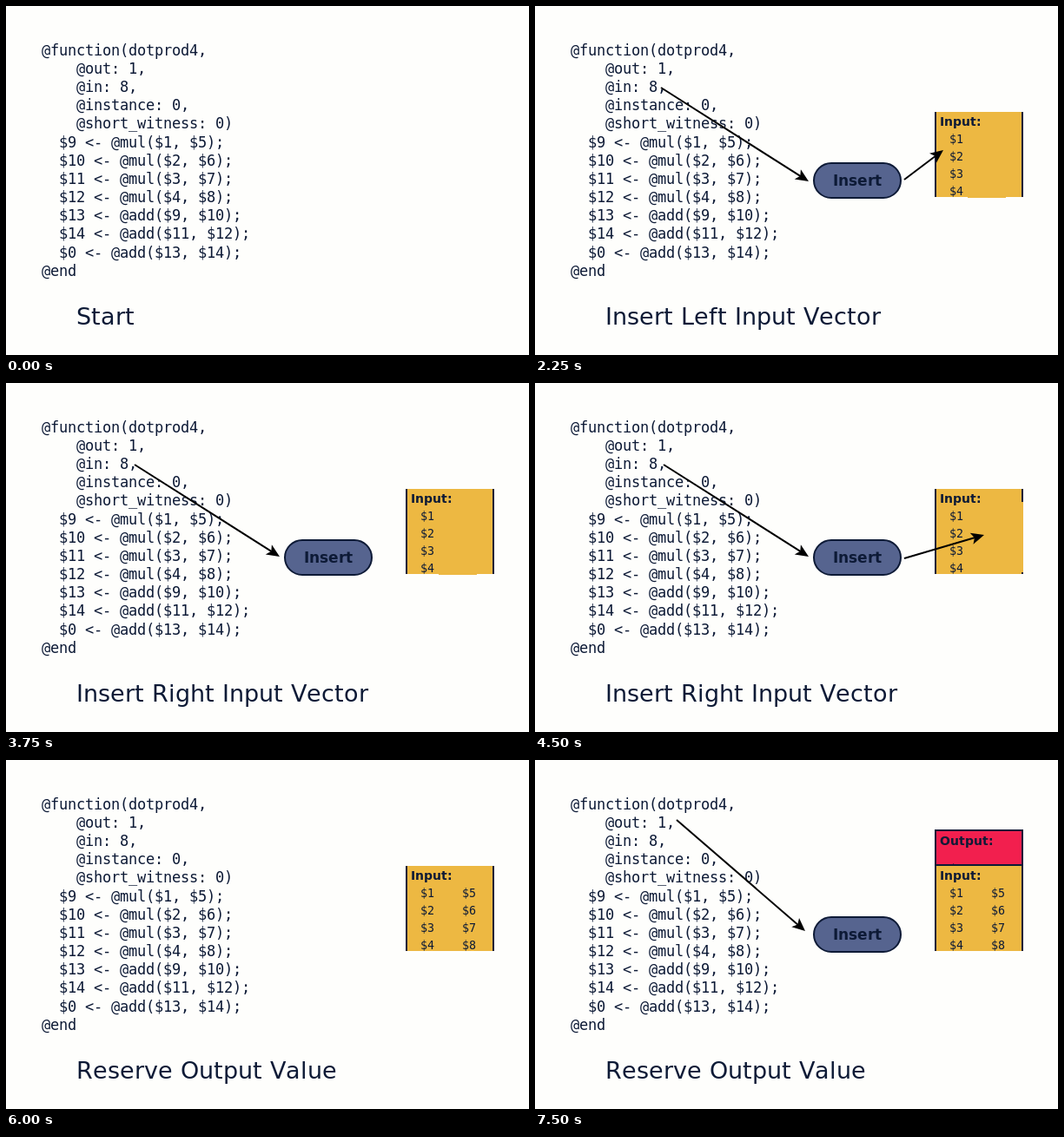
These frames come from a looping animation (602x402 px, 8 s). An HTML page:

```html
<!DOCTYPE html>
<html lang="en">
<head>
<meta charset="utf-8">
<title>Dot product steps</title>
<style>
  html, body { margin: 0; width: 100%; height: 100%; overflow: hidden; background: #fefefc; }
  svg { display: block; }
</style>
</head>
<body>
<svg id="stage" width="602" height="402" viewBox="0 0 602 402"></svg>
<script>
const STEP = 750, LOOP = 8000;
const INK = "#0d1a36", ORANGE = "#edb842", RED = "#f21f4e", BLUE = "#56648f";
const FONT = {
  code: "17px 'DejaVu Sans Mono', monospace",
  cell: "13.33px 'DejaVu Sans Mono', monospace",
  title: "27px 'DejaVu Sans', sans-serif",
  label: "bold 14px 'DejaVu Sans', sans-serif",
  pill: "bold 17px 'DejaVu Sans', sans-serif",
};
const stage = document.getElementById("stage");
const measure = document.createElement("canvas").getContext("2d");

const CODE = `@function(dotprod4,
    @out: 1,
    @in: 8,
    @instance: 0,
    @short_witness: 0)
  $9 <- @mul($1, $5);
  $10 <- @mul($2, $6);
  $11 <- @mul($3, $7);
  $12 <- @mul($4, $8);
  $13 <- @add($9, $10);
  $14 <- @add($11, $12);
  $0 <- @add($13, $14);
@end`.split("\n");

// Sets text with every glyph advance rounded to a whole pixel.
function text(x, y, font, string) {
  measure.font = font;
  const xs = [...string].map(char => {
    const left = x;
    x += Math.round(measure.measureText(char).width);
    return left;
  });
  const content = string.replace(/ /g, "\u00a0").replace(/</g, "&lt;");
  return `<text x="${xs.join(" ")}" y="${y}" fill="${INK}" style="font: ${font}">${content}</text>`;
}

const rect = (x, y, w, h, fill, extra = "") =>
  `<rect x="${x}" y="${y}" width="${w}" height="${h}" fill="${fill}" ${extra}/>`;

function arrow(x1, y1, x2, y2) {
  const angle = Math.atan2(y2 - y1, x2 - x1) * 180 / Math.PI;
  const length = Math.hypot(x2 - x1, y2 - y1);
  return `<g transform="translate(${x2} ${y2}) rotate(${angle})">
    <path d="M${-length} 0H-10" stroke="#000" stroke-width="2"/>
    <path d="M0 0L-15 6.7L-11.5 0L-15 -6.7Z"/></g>`;
}

const codeBlock = CODE.map((line, i) =>
  text(41, Math.floor(57.15 + i * 21.18), FONT.code, line)).join("");

const insertPill = rect(321, 181, 100, 40, BLUE, `rx="20" stroke="${INK}" stroke-width="2"`) +
  text(343, 207, FONT.pill, "Insert");

const column = (x, first) => [0, 1, 2, 3].map(i =>
  text(x, 158 + i * 20, FONT.cell, "$" + (first + i))).join("");

function inputBox(step) {
  let out = rect(460, 122, 102, 98, INK) + rect(462, 122, 98, 98, ORANGE);
  if (step < 6) {
    const left = step < 3 ? 468 : 498;
    out += rect(left, 220, 542 - left, 1, ORANGE);
  } else if (step < 8) {
    out += rect(560, 137, 2, 81, ORANGE);
  }
  out += text(466, 138, FONT.label, "Input:");
  if (step >= 3) out += column(477, 1);
  if (step >= 7) out += column(525, 5);
  return out;
}

const outputBox = rect(461, 81, 100, 40, RED, `stroke="${INK}" stroke-width="2"`) +
  rect(481, 119, 1, 1, INK, 'opacity=".6"') + text(466, 98, FONT.label, "Output:");

function titleFor(step) {
  if (step < 1) return "Start";
  if (step < 4) return "Insert Left Input Vector";
  if (step < 8) return "Insert Right Input Vector";
  return "Reserve Output Value";
}

function scene(step) {
  const between = (a, b) => step >= a && step < b;
  let out = codeBlock + text(81, 367, FONT.title, titleFor(step));
  if (step >= 1) out += inputBox(step);
  if (step >= 9) out += outputBox;
  if (between(1, 4) || between(5, 8) || step >= 10) out += insertPill;
  if (between(1, 4)) out += arrow(145, 94, 315, 202);
  if (between(2, 4)) out += arrow(425, 200, 470, 166);
  if (between(5, 8)) out += arrow(148, 94, 315, 200);
  if (between(6, 8)) out += arrow(425, 202, 517, 175);
  if (step >= 10) out += arrow(163, 69, 311, 197);
  return out;
}

let shown = -1;
function draw() {
  const step = Math.floor(performance.now() % LOOP / STEP);
  if (step !== shown) stage.innerHTML = scene(shown = step);
  requestAnimationFrame(draw);
}
draw();
</script>
</body>
</html>
```
